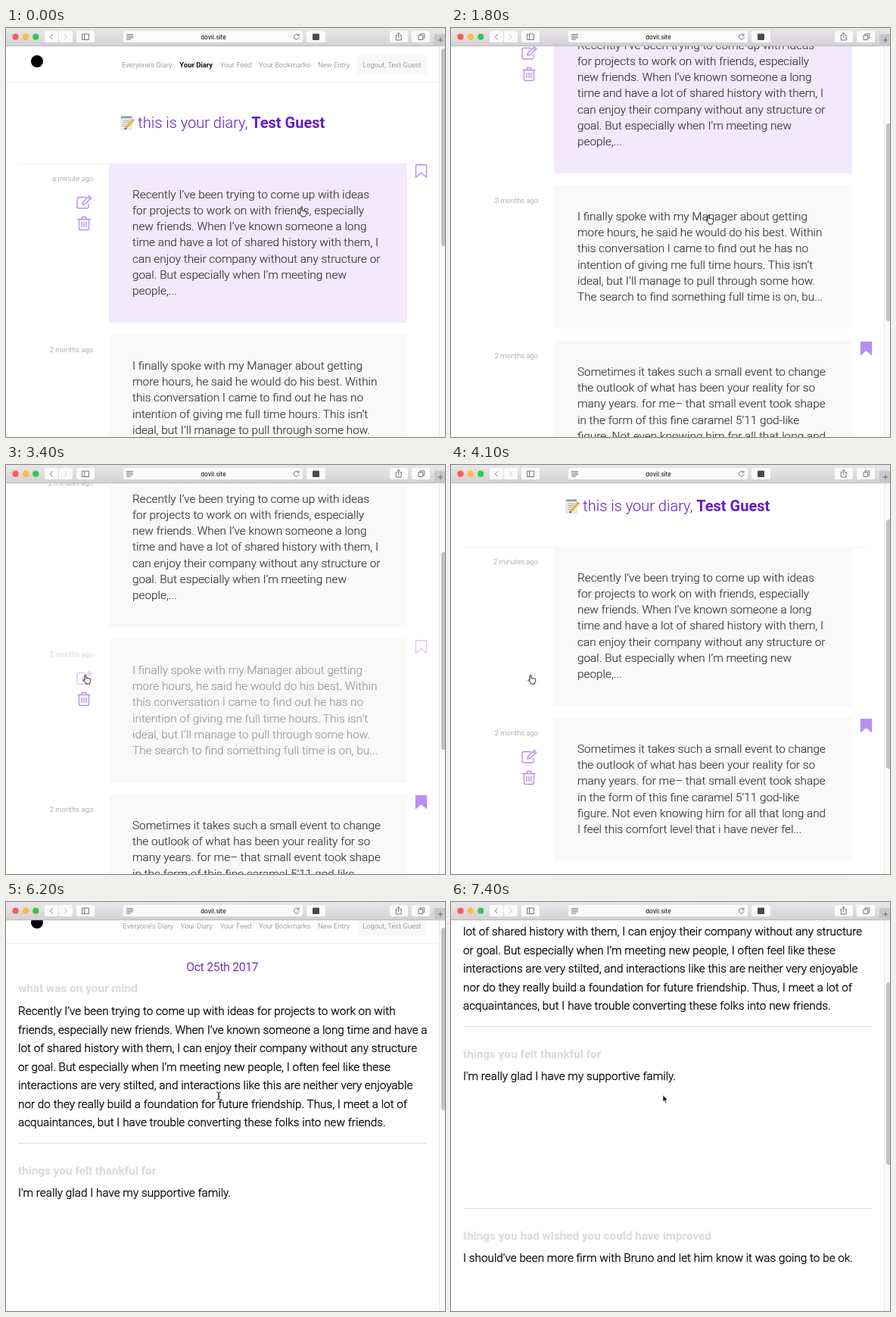
An HTML page for the animation above (7500 ms loop, 580x540 px).

```html
<!DOCTYPE html>
<html lang="en">
<head>
<meta charset="utf-8">
<title>Diary</title>
<style>
  html, body { margin: 0; width: 100%; height: 100%; overflow: hidden; background: #fff; }
  #stage { position: relative; width: 580px; height: 540px; overflow: hidden; background: #fff;
    font: 300 15.35px Roboto, "Open Sans", sans-serif; color: #333; }
  #stage svg { display: block; }
  .page, .bar, .track, #thumb, #cursor, .abs { position: absolute; }
  .page { left: 0; top: 0; width: 572px; height: 1100px; }
  .hide { display: none; }

  .head { position: absolute; left: 0; top: 24px; width: 572px; height: 47px; border-bottom: 1px solid #eee; }
  .mark { position: absolute; left: 33px; top: 12px; width: 16px; height: 16px; border-radius: 50%; background: #000; }
  nav { position: absolute; right: 16px; top: 12px; height: 25px; display: flex; align-items: center;
    gap: 9.8px; font-size: 9.42px; color: #777; white-space: nowrap; }
  nav b { color: #111; }
  nav .out { width: 92px; line-height: 25px; text-align: center; background: #f8f8f8; border-radius: 3px; }

  .title { left: 0; top: 113px; width: 572px; display: flex; justify-content: center;
    font-size: 20px; line-height: 24px; color: #651bc4; white-space: pre; }
  .title svg { margin: 2px 4.5px 0 0; }
  .rule { left: 16px; top: 178.5px; width: 534px; height: 1px; background: #f5f5f5; }
  #rows { left: 0; top: 179px; width: 572px; }
  .row { position: relative; margin-bottom: 16px; --fade: 1; }
  .card { margin-left: 136px; width: 332px; padding: 31px; min-height: 126.9px;
    line-height: 21.15px; white-space: pre; background: #f9f9f9; -webkit-text-stroke: .15px; }
  .card span, .when, .save, .edit { opacity: var(--fade); }
  .lit .card { background: #f3e9fc; }
  .when { right: 457px; top: 14px; line-height: 12px; font-size: 9.45px; color: #8c8c8c; white-space: nowrap; }
  .save { left: 540px; top: 0; }
  .edit { left: 92px; top: 41px; }
  .bin { left: 93px; top: 69px; }
  .save, .edit, .bin { visibility: hidden; color: #bb8df0; }
  .over .save, .over .edit, .over .bin, .kept .save { visibility: visible; }
  .kept .save path { fill: currentColor; }

  #entry .abs { left: 16px; width: 540px; font-size: 15.3px; line-height: 24.5px; color: #000;
    white-space: pre; -webkit-text-stroke: .3px; }
  #entry .day { top: 90.5px; text-align: center; color: #5f18bc; }
  #entry h2.abs { margin: 0; font-weight: 700; color: #dadada; -webkit-text-stroke: 0; }
  #entry .line { height: 1px; background: #ddd; }

  .track { left: 572px; top: 24px; width: 7px; height: 516px; background: #fafafa; border-left: 1px solid #e8e8e8; }
  #thumb { left: 574.5px; width: 7px; border-radius: 3.5px; background: #c1c1c1; }
  .bar { left: 0; top: 0; }
  #cursor { left: -8px; top: -8px; }
</style>
</head>
<body>
<div id="stage">
  <div class="page" id="list">
    <div class="head"><div class="mark"></div>
      <nav><span>Everyone’s Diary</span><b>Your Diary</b><span>Your Feed</span><span>Your Bookmarks</span><span>New Entry</span><span class="out">Logout, Test Guest</span></nav>
    </div>
    <div class="abs title"><svg width="19" height="20" viewBox="0 0 19 20">
      <path d="M1 2h14v17H1z" fill="#f1f1ee" stroke="#c9c9c5" stroke-width=".7"/>
      <path d="M1 1.5h14v2.6H1z" fill="#8f9aa0"/>
      <path d="M3 7h10M3 9.5h10M3 12h8M3 14.5h6" stroke="#9aa5ad" stroke-width=".9"/>
      <path d="M6 16.5 15 6l2.6 2.2-9 10z" fill="#f2b632"/><path d="m15 6 1.3-1.5 2.6 2.2-1.3 1.5z" fill="#e58478"/>
      <path d="m6 16.5 2.6 1.7-3.4 1.2z" fill="#5b4636"/>
    </svg><span>this is your diary, <b>Test Guest</b></span></div>
    <div class="abs rule"></div>
    <div class="abs" id="rows"></div>
  </div>

  <div class="page hide" id="entry">
    <div class="head"><div class="mark"></div>
      <nav><span>Everyone’s Diary</span><span>Your Diary</span><span>Your Feed</span><span>Your Bookmarks</span><span>New Entry</span><span class="out">Logout, Test Guest</span></nav>
    </div>
    <div class="abs day">Oct 25th 2017</div>
    <h2 class="abs" style="top:119px">what was on your mind</h2>
    <div class="abs" style="top:149px">Recently I’ve been trying to come up with ideas for projects to work on with
friends, especially new friends. When I’ve known someone a long time and have a
lot of shared history with them, I can enjoy their company without any structure
or goal. But especially when I’m meeting new people, I often feel like these
interactions are very stilted, and interactions like this are neither very enjoyable
nor do they really build a foundation for future friendship. Thus, I meet a lot of
acquaintances, but I have trouble converting these folks into new friends.</div>
    <div class="abs line" style="top:334.5px"></div>
    <h2 class="abs" style="top:359.5px">things you felt thankful for</h2>
    <div class="abs" style="top:389px">I'm really glad I have my supportive family.</div>
    <div class="abs line" style="top:574.5px"></div>
    <h2 class="abs" style="top:599.5px">things you had wished you could have improved</h2>
    <div class="abs" style="top:629px">I should've been more firm with Bruno and let him know it was going to be ok.</div>
  </div>

  <div class="track"></div>
  <div id="thumb"></div>

  <svg class="bar" width="580" height="25" fill="none" stroke="#666" stroke-width=".9">
    <defs><linearGradient id="metal" x2="0" y2="1"><stop stop-color="#e9e7e9"/><stop offset="1" stop-color="#d3d1d3"/></linearGradient></defs>
    <path d="M0 0h580v24H0z" fill="url(#metal)" stroke="none"/>
    <path d="M0 23.7h580" stroke="#b5b3b5"/>
    <g stroke="none">
      <circle cx="12.5" cy="11.7" r="4.1" fill="#fc5b57"/>
      <circle cx="26" cy="11.7" r="4.1" fill="#fdbc40"/>
      <circle cx="39.3" cy="11.7" r="4.1" fill="#34c84a"/>
      <g fill="#fbfbfb">
        <rect x="51" y="4" width="18" height="15" rx="2.5"/><rect x="70" y="4" width="18" height="15" rx="2.5"/>
        <rect x="93" y="4" width="24" height="15" rx="2.5"/><rect x="155" y="4" width="237" height="15" rx="2.5"/>
        <rect x="397" y="4" width="25" height="15" rx="2.5"/><rect x="507" y="4" width="24" height="15" rx="2.5"/>
        <rect x="536" y="4" width="24" height="15" rx="2.5"/>
      </g>
      <path d="M566 8h14v16h-14z" fill="#c9c7c9"/>
      <rect x="405" y="7.5" width="9" height="8.5" rx="1" fill="#4a4a4a"/>
      <text x="274" y="14.6" text-anchor="middle" font-family="Inter, Roboto, sans-serif" font-size="7.8" font-weight="500" fill="#222">dovil.site</text>
    </g>
    <path d="m61.5 8.3-3.2 3.4 3.2 3.4"/><path d="m77 8.3 3.2 3.4-3.2 3.4" stroke="#bbb"/>
    <path d="M100.5 8h9v7.5h-9zM103.5 8v7.5M159 8.5h9M159 10.7h9M159 12.9h9M159 15.1h6"/>
    <path d="M386.5 9.6a3.4 3.4 0 1 0 .7 2.3M387 7.5v2.4h-2.4"/>
    <path d="M517 9.5h-1.8v6.5h7v-6.5h-1.8M518.7 13V6.3m-1.9 1.9 1.9-1.9 1.9 1.9"/>
    <path d="M545 9.8h5.8v5.7H545zM547 9.5V7.8h5.8v5.7h-1.7M570.5 16h7M574 12.5v7"/>
  </svg>

  <svg id="cursor" width="16" height="16" stroke-linejoin="round" stroke-linecap="round">
    <path class="hand" fill="#fff" stroke="#222" d="M5 9V3.2a1 1 0 0 1 2 0V6.5q1.2-.8 1.9.3 1.2-.7 1.9.4 1.7-.5 1.9 1v2.3q-.3 1.6-1.2 2.5v1H6.5v-1L2.8 9.3q.6-1.5 2.2-.3z"/>
    <path class="beam" fill="none" stroke="#333" d="M5.5 3Q8 3 8 5v6q0 2-2.5 2M10.5 3Q8 3 8 5v6q0 2 2.5 2M7 9h2"/>
    <path class="arrow" fill="#111" stroke="#fff" stroke-width=".7" d="M6 3v9l2-1.9L9.4 13.4l1.5-.7-1.4-3.1h2.7z"/>
  </svg>
</div>

<script>
const $ = id => document.getElementById(id);
const LOOP = 7500, STEP = 100;

const entries = [
`Recently I’ve been trying to come up with ideas
for projects to work on with friends, especially
new friends. When I’ve known someone a long
time and have a lot of shared history with them, I
can enjoy their company without any structure or
goal. But especially when I’m meeting new
people,...`,
`I finally spoke with my Manager about getting
more hours, he said he would do his best. Within
this conversation I came to find out he has no
intention of giving me full time hours. This isn’t
ideal, but I’ll manage to pull through some how.
The search to find something full time is on, bu...`,
`Sometimes it takes such a small event to change
the outlook of what has been your reality for so
many years. for me– that small event took shape
in the form of this fine caramel 5’11 god-like
figure. Not even knowing him for all that long and
I feel this comfort level that i have never fel...`,
''];

const icon = (name, w, h, d) =>
  `<svg class="abs ${name}" width="${w}" height="${h}" fill="none" stroke="currentColor" stroke-width="1.4" stroke-linejoin="round"><path d="${d}"/></svg>`;

$('rows').innerHTML = entries.map((text, i) => `
  <div class="row${i === 2 ? ' kept' : ''}">
    <div class="abs when">2 months ago</div>
    ${icon('edit', 24, 20, 'M14 3.5H4q-2 0-2 2v10.5q0 2 2 2h11q2 0 2-2v-4M9 13l.8-3.4L18 1.8l2.8 2.7-8.2 7.8zM16.2 3.6l2.7 2.7')}
    ${icon('bin', 20, 20, 'M1.5 4.5h17M6.5 4.5l1-3h5l1 3M3.5 4.5v12q0 2 2 2h9q2 0 2-2v-12M7 8v7M10 8v7M13 8v7')}
    <div class="card"><span>${text}</span></div>
    ${icon('save', 18, 20, 'M1.5 1.7h14v16.6l-7-6-7 6z')}
  </div>`).join('');

const rows = [...document.querySelectorAll('.row')];
const firstDate = rows[0].querySelector('.when');
const shapes = ['hand', 'beam', 'arrow'].map(c => document.querySelector('#cursor .' + c));

const scrollPath = [[0, 0], [900, 0], [1100, 18], [1300, 62.5], [1700, 181], [1800, 197], [2000, 201], [2300, 175],
  [3600, 175], [4100, 71], [4500, 0], [6000, 0], [6200, 17], [6600, 80], [7000, 140], [7300, 168], [7400, 171]];
const cursorPath = [[0, 392, 243], [200, 392, 243], [800, 342, 253], [2500, 342, 253], [3000, 104, 307],
  [3200, 104, 307], [3400, 107, 283], [4200, 107, 283], [4700, 281, 256], [6300, 281, 256], [6700, 282, 260]];

// Linear interpolation along [time, ...values] points
function glide(path, t) {
  const n = path.findIndex(p => p[0] > t);
  if (n < 0) return path[path.length - 1].slice(1);
  const a = path[n - 1], b = path[n], k = (t - a[0]) / (b[0] - a[0]);
  return a.slice(1).map((v, i) => v + (b[i + 1] - v) * k);
}

// Value of the last [time, value] reached
const hold = (list, t) => list.filter(p => p[0] <= t).pop()[1];

function draw(t) {
  const [scroll] = glide(scrollPath, t);
  const [x, y] = glide(cursorPath, t);
  const open = t >= 5200, removed = t >= 3600;
  const over = hold([[0, 0], [1900, 1], [3600, 2], [4400, 0]], t);
  const lit = hold([[0, 0], [1900, 1], [2600, -1], [4500, 0]], t);
  const shape = hold([[0, 0], [5200, 1], [6700, 2]], t);
  const nudge = t >= 900 && t < 1700 ? -1 : 0;

  $('list').classList.toggle('hide', open);
  $('entry').classList.toggle('hide', !open);
  $(open ? 'entry' : 'list').style.transform = `translate(${nudge}px, ${-scroll}px)`;

  rows.forEach((row, i) => {
    row.classList.toggle('over', i === over);
    row.classList.toggle('lit', i === lit);
  });
  rows[1].classList.toggle('hide', removed);
  rows[1].style.setProperty('--fade', Math.min(1, Math.max(0, (3600 - t) / 400)));
  firstDate.textContent = t < 2400 ? 'a minute ago' : '2 minutes ago';

  const ratio = 512 / (open ? 1098 : removed ? 803 : 1012);
  $('thumb').style.top = 26.5 + scroll * ratio + 'px';
  $('thumb').style.height = 516 * ratio + 'px';

  $('cursor').style.transform = `translate(${x}px, ${y}px)`;
  shapes.forEach((s, i) => s.classList.toggle('hide', i !== shape));
}

const start = performance.now();
function tick() {
  const t = (performance.now() - start) % LOOP;
  draw(Math.floor(t / STEP) * STEP);
  requestAnimationFrame(tick);
}
tick();
</script>
</body>
</html>
```
